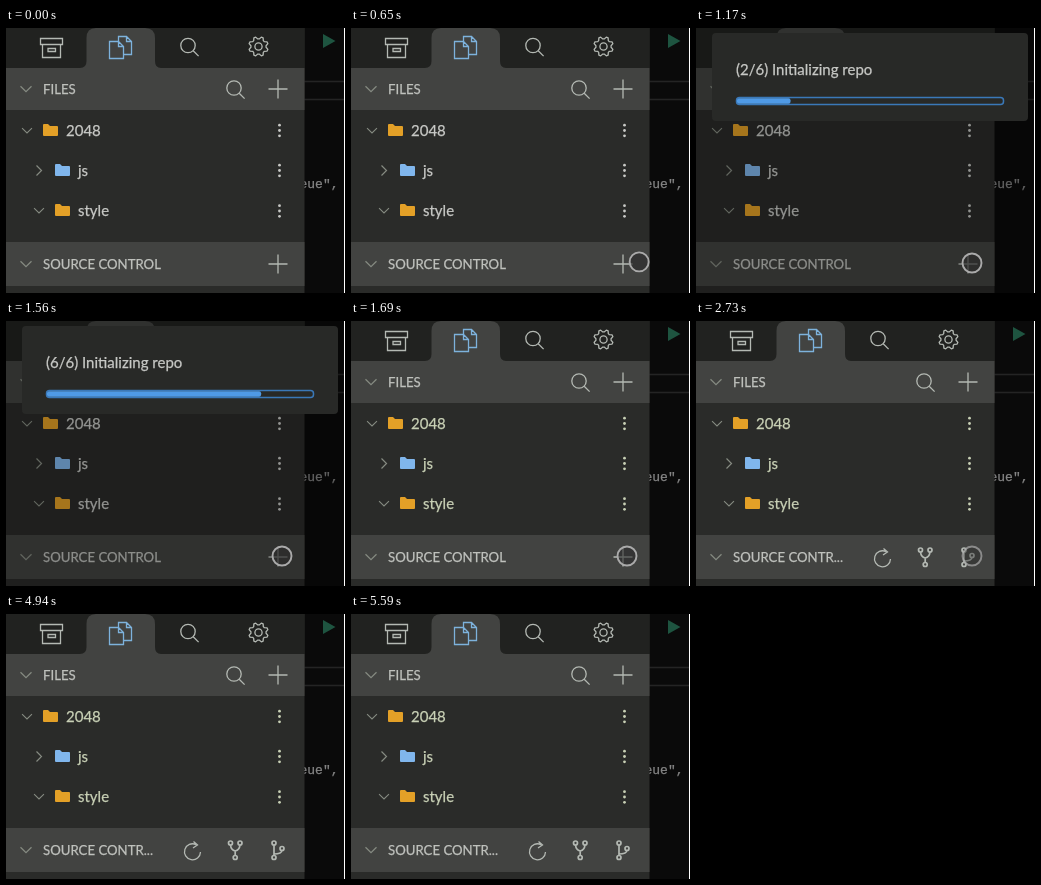
An HTML page for the animation above (5720 ms loop, 339x265 px).

```html
<!DOCTYPE html>
<html lang="en">
<head>
<meta charset="utf-8">
<title>Source control panel</title>
<style>
  html, body { margin: 0; width: 100%; height: 100%; overflow: hidden; background: #0a0a0a; }
  svg { display: block; width: 100vw; height: 100vh; }
  text { font: 15px Lato, sans-serif; fill: #c8c9c6; stroke: #c8c9c6; stroke-width: .25; }
  .head { font-size: 13.2px; fill: #bfc1bd; stroke: #bfc1bd; }
  .code { font: 13px "Liberation Mono", monospace; fill: #858585; stroke: #858585; }
  .line { fill: none; stroke: #b4b9b3; stroke-width: 1.3; }
  .bold { stroke-width: 1.7; }
  .chev { fill: none; stroke: #868b82; stroke-width: 1.2; }
  #rows text, #rows .dots { fill: var(--ink); stroke: var(--ink); }
  #rows .dots { stroke: none; }
</style>
</head>
<body>
<svg viewBox="0 0 339 265">
  <defs>
    <path id="down" class="chev" d="M-5.5-2.7 0 2.7 5.5-2.7"/>
    <path id="plus" class="line" d="M-9.5 0H9.5M0-9.5V9.5"/>
    <path id="folder" d="M0 1Q0 0 1 0H5L7 2H14Q15 2 15 3V11Q15 12 14 12H1Q0 12 0 11Z"/>
    <g id="dots"><circle cy="-5.3" r="1.4"/><circle r="1.4"/><circle cy="5.3" r="1.4"/></g>
    <g id="lens" class="line"><circle r="7.2"/><path d="M5.2 5.2 10.6 10.6"/></g>
  </defs>

  <!-- editor behind the panel -->
  <rect width="339" height="265" fill="#0a0a0a"/>
  <path d="M298 53.5H339M298 71.5H339" stroke="#242424" stroke-width="1.6"/>
  <path d="M317 6V20L329.5 13Z" fill="#1e5440"/>
  <text class="code" x="293.5" y="160">eue",</text>

  <!-- panel -->
  <rect width="298.5" height="265" fill="#2a2b29"/>
  <rect width="298.5" height="40" fill="#212220"/>
  <path d="M74 40Q80.5 40 80.5 33V10Q80.5 0 90 0H139Q149 0 149 10V33Q149 40 155 40H298.5V82H0V40Z" fill="#424341"/>
  <rect y="214" width="298.5" height="44" fill="#424341"/>

  <!-- tabs -->
  <path class="line" d="M34.5 10.5H56.5V16.5H34.5ZM36.5 16.5V29.5H54.5V16.5M42 20.5H49.5V23.5H42Z"/>
  <path class="line" style="stroke:#7db2dc" d="M112.5 13V8.5H120.5L125.5 13.5V26.5H118M120.5 8.5V13.5H125.5M103.5 13.5H112.5L117.5 18.5V30.5H103.5ZM112.5 13.5V18.5H117.5"/>
  <use href="#lens" x="182" y="17.5"/>
  <path id="gear" class="line" stroke-linejoin="round"/>
  <circle class="line" cx="252.5" cy="18.5" r="3.6"/>

  <!-- section heads -->
  <use href="#down" x="20" y="61"/>
  <text class="head" x="37" y="66">FILES</text>
  <use href="#lens" x="228" y="60"/>
  <use href="#plus" x="272" y="61"/>
  <use href="#down" x="20" y="236"/>
  <text class="head" x="37" y="241" id="title"></text>
  <use href="#plus" x="272" y="236" id="add"/>
  <g id="tools" class="line">
    <path d="M194.5 238A8 8 0 1 1 190 230.6M187.5 227.5 191.5 231 187 234"/>
    <g class="line bold">
      <circle cx="224.5" cy="229" r="2"/><circle cx="234" cy="229" r="2"/><circle cx="229.2" cy="243.5" r="2"/>
      <path d="M224.5 231Q225 236 229.2 237Q233.5 236 234 231M229.2 237V241.5"/>
      <circle cx="268" cy="229" r="2"/><circle cx="268" cy="243.5" r="2"/><circle cx="276" cy="234.5" r="2"/>
      <path d="M268 231V241.5M276 236.5Q275.5 240 268 240"/>
    </g>
  </g>

  <!-- tree -->
  <g id="rows">
    <use href="#down" transform="translate(21 102.5) scale(.9)"/>
    <use href="#folder" x="37" y="96" fill="#e3a027"/>
    <text x="60" y="108">2048</text>
    <path class="chev" d="M30.5 137.5 35.5 142.5 30.5 147.5"/>
    <use href="#folder" x="49" y="136" fill="#80b6ec"/>
    <text x="72" y="148">js</text>
    <use href="#down" transform="translate(33 182.5) scale(.9)"/>
    <use href="#folder" x="49" y="176" fill="#e3a027"/>
    <text x="72" y="188">style</text>
    <g class="dots">
      <use href="#dots" x="273.5" y="102.5"/>
      <use href="#dots" x="273.5" y="142.5"/>
      <use href="#dots" x="273.5" y="183"/>
    </g>
  </g>

  <!-- progress dialog -->
  <g id="dialog">
    <rect width="339" height="265" opacity=".27"/>
    <rect x="16" y="5" width="316" height="88" rx="4" fill="#282927"/>
    <text x="40" y="47" id="step"></text>
    <rect x="40.5" y="69.5" width="267" height="7" rx="3" fill="none" stroke="#3a78b8" stroke-width="1.5"/>
    <rect x="41" y="70.3" height="5.4" rx="2" fill="#4f9ae6" id="bar"/>
  </g>

  <circle id="touch" r="9.5" fill="#2c2c2c" fill-opacity=".6" stroke="#aaa" stroke-width="1.9"/>
  <rect x="338" width="1" height="265" fill="#fff"/>
</svg>
<script>
const LOOP = 5720, TICK = 130;
const el = id => document.getElementById(id);
const show = (id, on) => el(id).style.display = on ? '' : 'none';
const ramp = (t, from, to) => Math.min(1, Math.max(0, (t - from) / (to - from)));

// eight teeth, four corners each
el('gear').setAttribute('d', 'M' + Array.from({ length: 32 }, (_, i) => {
  const angle = (i - 1.5) * Math.PI / 16, r = i % 4 === 0 || i % 4 === 3 ? 9.8 : 7.6;
  return [252.5 + r * Math.sin(angle), 18.5 - r * Math.cos(angle)].map(v => v.toFixed(2));
}).join('L') + 'Z');

function draw(time) {
  const t = Math.floor(time % LOOP / TICK) * TICK;

  const ready = t >= 1950;
  el('title').textContent = ready ? 'SOURCE CONTR...' : 'SOURCE CONTROL';
  show('add', !ready);
  show('tools', ready);
  el('rows').style.setProperty('--ink', t >= 1690 ? '#c9d1b6' : '#c8c9c6');

  show('dialog', t >= 1170 && t < 1690);
  const progress = 0.805 * ramp(t, 1040, 1560);
  el('step').textContent = `(${1 + Math.round(progress * 6)}/6) Initializing repo`;
  el('bar').setAttribute('width', 266 * progress);

  const travel = 1 - (1 - ramp(t, 260, 910)) ** 2;
  const touch = el('touch');
  show('touch', t >= 390 && t < 2860);
  touch.setAttribute('cx', 352 - 76 * travel);
  touch.setAttribute('cy', 228 + 7 * travel);
  touch.setAttribute('opacity', t >= 2730 ? 0.7 : 1);

  requestAnimationFrame(() => draw(performance.now() - start));
}
const start = performance.now();
draw(0);
</script>
</body>
</html>
```
